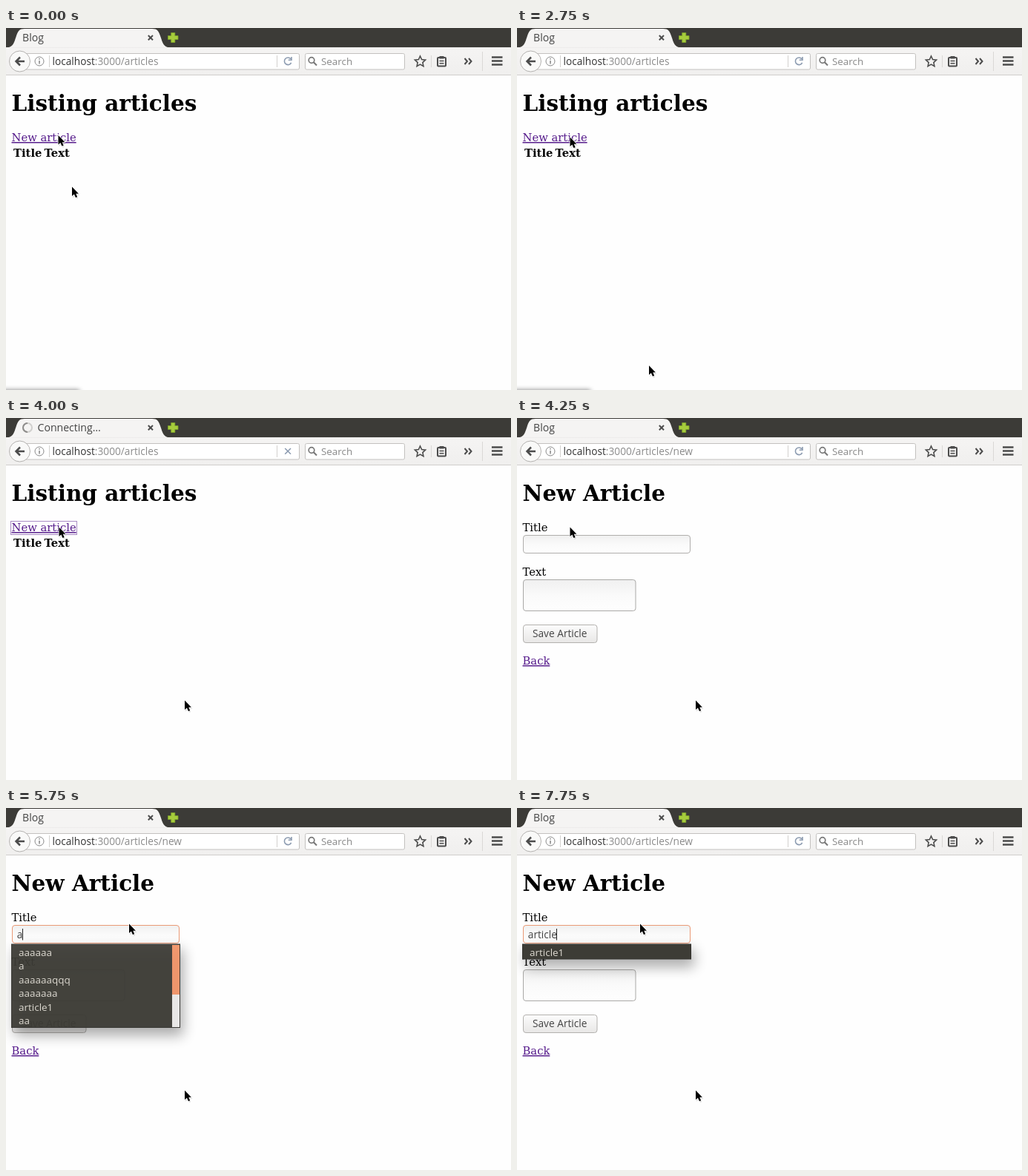
Animation, 681 px wide and 489 px high, one loop 8000 ms. Source, as an HTML page:

```html
<!DOCTYPE html>
<html lang="en">
<head>
<meta charset="utf-8">
<title>Blog</title>
<style>
  html, body { margin: 0; width: 100%; height: 100%; overflow: hidden; background: #fefefe; }
  svg { display: block; width: 100vw; height: 100vh; }
  text { white-space: pre; }
  .page { font: 14.75px "DejaVu Serif", serif; fill: #000; }
  .head { font-size: 29.5px; font-weight: bold; }
  .bold { font-weight: bold; }
  .link { fill: #551a8b; text-decoration: underline 1px; }
  .ui { font: 13.7px "Open Sans", sans-serif; fill: #434343; }
  .line { fill: none; stroke: #4c4c4c; stroke-width: 2; }
</style>
</head>
<body>
<svg viewBox="0 0 681 489" preserveAspectRatio="none">
  <defs>
    <linearGradient id="bar" x2="0" y2="1">
      <stop stop-color="#f5f4f3"/><stop offset="1" stop-color="#f0efee"/>
    </linearGradient>
    <linearGradient id="inset" x2="0" y2="1">
      <stop stop-color="#f0f0f0"/><stop offset=".5" stop-color="#fafafa"/><stop offset="1" stop-color="#fefefe"/>
    </linearGradient>
    <linearGradient id="raised" x2="0" y2="1">
      <stop stop-color="#fcfcfc"/><stop offset="1" stop-color="#e8e7e6"/>
    </linearGradient>
    <filter id="soft" x="-30%" y="-150%" width="160%" height="400%"><feGaussianBlur stdDeviation="9"/></filter>
    <filter id="edge" x="-30%" y="-300%" width="160%" height="700%"><feGaussianBlur stdDeviation="3.2"/></filter>
    <g id="arrow">
      <path d="M1 2V15L4 12.500L6 16.500L8.300 15.600L6.500 11.500H10.500Z" fill="#000" opacity=".12"/>
      <path d="M0 0V12.600L2.900 10.100L4.900 14.600L7.200 13.700L5.300 9.300H8.900Z" fill="#000" stroke="#fff" stroke-width="1.500" paint-order="stroke" stroke-linejoin="round"/>
    </g>
  </defs>

  <rect width="681" height="489" fill="#fefefe"/>

  <g id="listing" class="page">
    <text class="head" x="7.500" y="112">Listing articles</text>
    <text class="link" x="7.500" y="153">New article</text>
    <text class="bold" x="10" y="173.500">Title</text>
    <text class="bold" x="51.500" y="173.500">Text</text>
    <rect id="outline" x="6.500" y="139.500" width="89" height="18" fill="none" stroke="#551a8b" stroke-dasharray="1 1"/>
  </g>

  <g id="form">
    <g class="page">
      <text class="head" x="7.500" y="112">New Article</text>
      <text x="7.500" y="153">Title</text>
      <text x="7.500" y="213">Text</text>
      <text class="link" x="7.500" y="333">Back</text>
    </g>
    <rect id="field" x="8.500" y="158.500" width="225" height="24" rx="3.500" fill="url(#inset)"/>
    <rect x="8.500" y="218.500" width="151.500" height="42" rx="3.500" fill="url(#inset)" stroke="#a9a8a6"/>
    <rect x="8.500" y="279.500" width="99.500" height="24" rx="3.500" fill="url(#raised)" stroke="#b3b1ae"/>
    <g class="ui">
      <text x="21" y="296">Save Article</text>
      <text id="typed" x="14.800" y="175.500"></text>
    </g>
    <path id="caret" d="M0 163V178.500" stroke="#222"/>
    <g id="popup">
      <rect id="shade" x="11" y="191" width="228" fill="#000" opacity=".32" filter="url(#soft)"/>
      <g id="menu">
        <rect id="panel" x="7.500" y="184" width="227" fill="#3d3c36" stroke="#33322e"/>
        <g id="scroll">
          <rect x="224" y="185" width="10" height="111" fill="#ecebea"/>
          <rect x="224" y="185" width="10" height="67" fill="#f29468"/>
        </g>
        <g id="items" class="ui" style="fill:#dfdbd2;font-size:13.5px"></g>
      </g>
    </g>
  </g>

  <rect id="status" x="-6" y="489" width="105" height="8" fill="#000" opacity=".5" filter="url(#edge)"/>

  <rect width="681" height="26.300" fill="#3c3b37"/>
  <rect y="26.300" width="681" height="37.700" fill="url(#bar)"/>
  <path d="M0 63.500H681" stroke="#cfcdcb"/>
  <path d="M1 26.500C10 26 11 19 13.500 12C16 4 18 1 25 1H197C204 1 206 4 208.500 12C211 19 212 26 221 26.500Z" fill="#f5f4f3"/>
  <path d="M191.800 10L198 16.200M198 10L191.800 16.200" class="line"/>
  <path d="M222.700 6.500H227.800V10.500H232V15.500H227.800V19.500H222.700V15.500H218.500V10.500H222.700Z" fill="#a6cb3c" stroke="#7fa52a" stroke-width=".8"/>
  <g id="spinner" fill="none" stroke-width="2">
    <circle cx="29" cy="13" r="6" stroke="#d0cfcd"/>
    <path d="M29 7A6 6 0 0 0 29 19" stroke="#8e8d8b"/>
  </g>
  <text id="tab" class="ui" y="18" style="font-size:14.1px"></text>

  <rect x="22" y="34.500" width="373.500" height="21.500" rx="2" fill="#fff" stroke="#c3c1bf"/>
  <circle cx="18.500" cy="45" r="14" fill="#f9f9f8" stroke="#b4b2b0"/>
  <path d="M25 45H14M19 39.500L13.500 45L19 50.500" class="line" style="stroke-width:2.500"/>
  <circle cx="45" cy="45" r="6" fill="none" stroke="#8a8a8a"/>
  <path d="M45 44V48.500M45 41V42.600" stroke="#7a7a7a" stroke-width="1.400"/>
  <path d="M58.500 37V53M365.500 37V53" stroke="#d3d1cf"/>
  <text class="ui" x="62.500" y="50" style="fill:#333">localhost<tspan id="path" fill="#8b8b8b"></tspan></text>
  <g fill="none" stroke="#8c9bb0" stroke-width="1.600">
    <path id="reload" d="M384 41.800A4.800 4.800 0 1 0 384.600 46.800M385 39V43.300H380.700"/>
    <path id="stop" d="M376.200 41L384 48.800M384 41L376.200 48.800"/>
  </g>
  <rect x="403.500" y="34.500" width="134" height="21.500" rx="2" fill="#fff" stroke="#c3c1bf"/>
  <circle cx="412" cy="43.500" r="3.800" class="line" style="stroke:#777;stroke-width:1.700"/>
  <path d="M414.800 46.300L419 50.500" class="line" style="stroke:#777"/>
  <text class="ui" x="425" y="50" style="font-size:13.4px;fill:#888">Search</text>
  <path d="M558.500 38L560.600 42.600L565.600 43.200L561.900 46.600L562.900 51.600L558.500 49.100L554.100 51.600L555.100 46.600L551.400 43.200L556.400 42.600Z" class="line" style="stroke-width:1.600"/>
  <path d="M573.500 37V53M642.500 32V58" stroke="#dad8d6"/>
  <rect x="582" y="40" width="11" height="11.500" rx="1" class="line"/>
  <path d="M584.500 38H590.500V41.500H584.500Z" fill="#4c4c4c"/>
  <path d="M584.500 44.500H590.500M584.500 47.800H590.500" class="line" style="stroke-width:1.400"/>
  <path d="M618.500 41L622 45L618.500 49M624 41L627.500 45L624 49" class="line"/>
  <path d="M655 39.500H669.500M655 44.500H669.500M655 49.500H669.500" class="line" style="stroke-width:2.600"/>

  <use id="ghost" href="#arrow"/>
  <use id="pointer" href="#arrow"/>
</svg>
<script>
const LOOP = 8000;
const $ = id => document.getElementById(id);
const show = (id, on) => $(id).setAttribute("visibility", on ? "inherit" : "hidden");
const set = (id, name, value) => $(id).setAttribute(name, value);
const write = (id, text) => { if ($(id).textContent !== text) $(id).textContent = text; };

// Each track holds [start, value] pairs; a value stays until the next start.
const at = (track, t) => track.filter(([start]) => start <= t).pop()[1];

const pointer = [[0, [70.5, 145]], [2750, [71.5, 147.5]], [4500, [206, 163]], [4750, [166, 156.5]]];
const ghost = [[0, [89, 214.5]], [250, null], [2750, [178, 456]], [3000, [205, 420]],
  [3250, [238, 385]], [3500, [241, 381.5]]];
const typing = [[0, ""], [5750, "a"], [6500, "ar"], [7000, "art"], [7250, "arti"],
  [7500, "articl"], [7750, "article"]];
const history = ["aaaaaa", "a", "aaaaaaqqq", "aaaaaaa", "article1", "aa"];

const rows = history.map((_, i) => {
  const row = document.createElementNS("http://www.w3.org/2000/svg", "text");
  row.setAttribute("x", 17);
  row.setAttribute("y", 199.8 + i * 18.5);
  $("items").append(row);
  return row;
});

function place(id, spot) {
  show(id, spot);
  if (spot) set(id, "transform", `translate(${spot})`);
}

function drawPopup(t, text) {
  show("popup", text);
  const full = text === "a";
  const list = full ? history : ["article1"];
  const height = full ? 112.5 : 20;
  rows.forEach((row, i) => { row.textContent = list[i] || ""; });
  set("panel", "height", height);
  set("shade", "height", height + 4);
  set("menu", "opacity", t < 6000 ? 0.94 : 1);
  show("scroll", full);
}

function draw(t) {
  const loaded = t >= 4250;
  const loading = t >= 4000 && !loaded;
  const focused = t >= 5000;
  const text = at(typing, t);

  show("listing", !loaded);
  show("form", loaded);
  show("outline", t >= 3750 && !loaded);
  show("status", t < 3250);
  show("spinner", loading);
  show("stop", loading);
  show("reload", !loading);
  write("tab", loading ? "Connecting…" : "Blog");
  set("tab", "x", loading ? 42.5 : 22);
  write("path", ":3000/articles" + (loaded ? "/new" : ""));

  set("field", "stroke", focused ? "#ea9a76" : "#b0aeac");
  write("typed", text);
  const end = text ? $("typed").getComputedTextLength() : 0;
  set("caret", "transform", `translate(${Math.floor(14.8 + end) + 0.5})`);
  show("caret", loaded && focused);
  if (loaded) drawPopup(t, text);

  place("pointer", at(pointer, t));
  place("ghost", at(ghost, t));
}

const start = performance.now();
function tick() {
  draw((performance.now() - start) % LOOP);
  requestAnimationFrame(tick);
}
tick();
</script>
</body>
</html>
```
